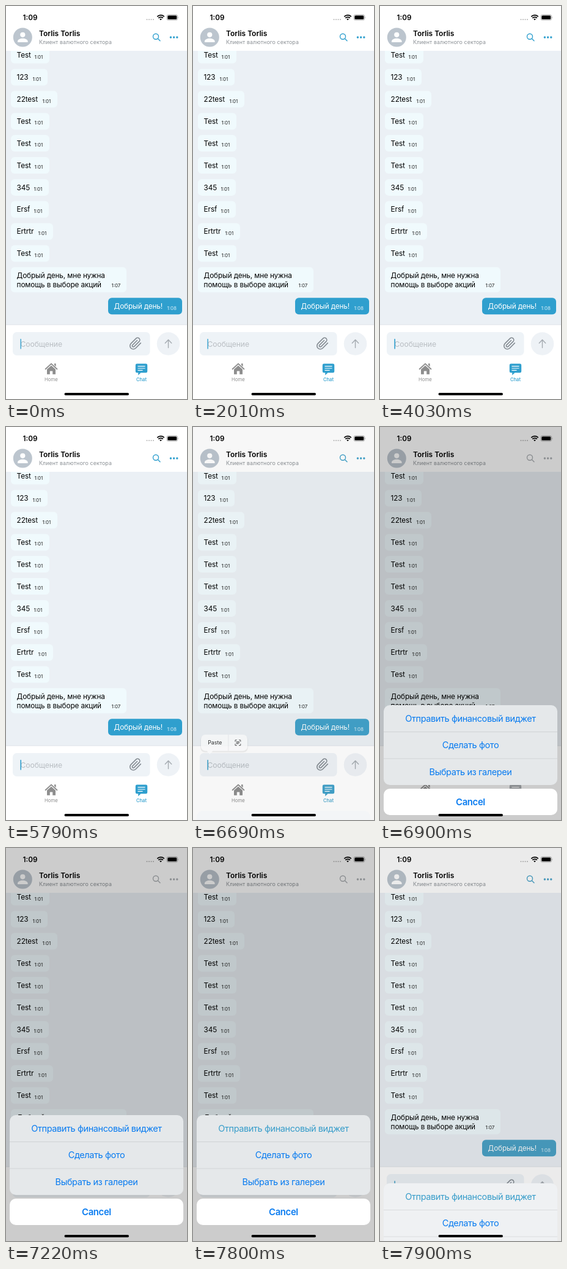
These frames come from a looping animation (296x640 px, 8 s). An HTML page:

```html
<!DOCTYPE html>
<html lang="ru">
<head>
<meta charset="utf-8">
<title>Chat</title>
<style>
  html, body { margin: 0; width: 100%; height: 100%; overflow: hidden; background: #fff; }
  svg { display: block; width: 296px; height: 640px; --accent: rgb(47,159,206); }
  text { font-family: Inter, "Open Sans", sans-serif; white-space: pre; }
  .msg { font-size: 11.8px; letter-spacing: -.12px; }
  .time { font-size: 8px; }
  .row { font-size: 14.5px; letter-spacing: -.4px; fill: #087bf0; text-anchor: middle; }
  .tint { fill: var(--accent); }
  .line { fill: none; stroke-linecap: round; stroke-linejoin: round; }
</style>
</head>
<body>
<svg viewBox="0 0 296 640">
  <rect width="296" height="640" fill="#fff"/>
  <rect y="73" width="296" height="446" fill="#ebf0f5"/>
  <g id="chat"></g>

  <rect width="296" height="73" fill="#fff"/>
  <text x="27.5" y="23" font-size="11.7" font-weight="600">1:09</text>
  <g fill="#b5b5b5">
    <circle cx="230.5" cy="22" r="1"/><circle cx="234" cy="22" r="1"/>
    <circle cx="237.5" cy="22" r="1"/><circle cx="241" cy="22" r="1"/>
  </g>
  <g class="line" stroke="#000" stroke-width="1.7" style="stroke-linecap:butt">
    <path d="M247.3 17.3a8 8 0 0 1 11.4 0M249.3 19.6a5.2 5.2 0 0 1 7.4 0"/>
    <path d="M251.2 21.2L253 23.2L254.8 21.2a2.8 2.8 0 0 0 -3.6 0z" fill="#000" stroke="none"/>
  </g>
  <rect x="263" y="14.3" width="17.6" height="8.8" rx="2.6" fill="none" stroke="#999" stroke-width=".8"/>
  <rect x="264.3" y="15.6" width="15" height="6.2" rx="1.5"/>
  <path d="M281.6 17.2q1.4 1.5 0 3z" fill="#999"/>

  <circle cx="27.3" cy="51" r="15.5" fill="#bcc5ce"/>
  <circle cx="27.3" cy="46.8" r="4.1" fill="#fff"/>
  <path d="M19 59v-1.2c0-3.4 4.6-5 8.3-5s8.3 1.6 8.3 5V59z" fill="#fff"/>
  <text x="54" y="49" font-size="12" font-weight="600">Torlis Torlis</text>
  <text x="54" y="62" font-size="8.8" letter-spacing=".12" fill="#8b9095">Клиент валютного сектора</text>
  <g class="line" style="stroke:var(--accent)" stroke-width="1.4">
    <circle cx="245" cy="49.8" r="4.5"/><path d="M248.4 53.2L252 56.8"/>
  </g>
  <g class="tint">
    <circle cx="269.4" cy="51" r="1.7"/><circle cx="274.6" cy="51" r="1.7"/><circle cx="279.8" cy="51" r="1.7"/>
  </g>

  <rect y="519" width="296" height="121" fill="#fff"/>
  <rect y="518.5" width="296" height="1" fill="#dfe4e9"/>
  <rect x="11" y="531" width="224.5" height="38" rx="6.5" fill="#eef3f7"/>
  <text x="23.5" y="554.8" font-size="12.2" letter-spacing="-.1" fill="#b9bec3">Сообщение</text>
  <rect id="caret" class="tint" x="23.4" y="542" width="1.6" height="16.5" rx=".6"/>
  <path class="line" transform="translate(201 539) scale(.9)" stroke="#858c93" stroke-width="1.8"
    d="M21.44 11.05l-9.19 9.19a6 6 0 0 1-8.49-8.49l9.19-9.19a4 4 0 0 1 5.66 5.66l-9.2 9.19a2 2 0 0 1-2.83-2.83l8.49-8.48"/>
  <circle cx="265.5" cy="550" r="18.8" fill="#eef2f6"/>
  <path class="line" d="M265.5 556.5V543.8M260.3 549l5.2-5.4l5.2 5.4" stroke="#a5abb1" stroke-width="1.4"/>

  <g fill="#8e8e8e">
    <path class="line" d="M64.6 591.2L74 582.6L83.4 591.2" style="stroke:#8e8e8e" stroke-width="1.9"/>
    <path d="M79 582.2h2.6v5l-2.6-2.4z"/>
    <path d="M74 585.4l7 6.3v8.1h-4.8v-5.4h-4.4v5.4H67v-8.1z"/>
    <text x="74" y="611" font-size="7.8" text-anchor="middle">Home</text>
  </g>
  <g class="tint">
    <path d="M214.2 582.5h14.6a2.4 2.4 0 0 1 2.4 2.4v10a2.4 2.4 0 0 1-2.4 2.4h-8.3l-4.3 4v-4h-2a2.4 2.4 0 0 1-2.4-2.4v-10a2.4 2.4 0 0 1 2.4-2.4z"/>
    <path d="M215.5 586.7h12M215.5 590h12M215.5 593.3h8" stroke="#fff" stroke-width="1.2"/>
    <text x="221.5" y="611" font-size="7.6" font-weight="500" text-anchor="middle">Chat</text>
  </g>

  <rect id="dim" width="296" height="640"/>

  <g id="menu">
    <rect x="-1" y="1" width="97" height="35" rx="9" fill="#000" opacity=".08"/>
    <path d="M9 0h77a9 9 0 0 1 9 9v15a9 9 0 0 1-9 9H24l-6 7l-6-7H9a9 9 0 0 1-9-9V9a9 9 0 0 1 9-9z" fill="#f7f8f9"/>
    <text x="14" y="20.5" font-size="11">Paste</text>
    <path d="M56 0v33" stroke="#d9dadc" stroke-width=".8"/>
    <path class="line" stroke="#222" stroke-width="1.1"
      d="M70 14v-3h3M78 11h3v3M81 19v3h-3M73 22h-3v-3M72.5 14.5h6M72.5 16.5h6M72.5 18.5h4"/>
  </g>

  <g id="sheet">
    <rect id="panel" x="6" y="435" width="284" height="130" rx="10"/>
    <path id="press" d="M6 478.5V445a10 10 0 0 1 10-10h264a10 10 0 0 1 10 10v33.5z"/>
    <path d="M6 478.5h284M6 522h284" stroke="#000" stroke-opacity=".13" stroke-width=".7"/>
    <text id="first" class="row" x="148" y="462">Отправить финансовый виджет</text>
    <text class="row" x="148" y="505.4">Сделать фото</text>
    <text class="row" x="148" y="549">Выбрать из галереи</text>
    <rect x="6" y="571" width="284" height="43" rx="10" fill="#fff"/>
    <text class="row" x="148" y="598" style="font-size:14.8px;font-weight:600;letter-spacing:-.3px">Cancel</text>
  </g>
  <rect x="95.5" y="630" width="105.5" height="4" rx="2"/>
</svg>
<script>
const LOOP = 8000;
const $ = id => document.getElementById(id);
const svg = document.querySelector('svg');
const mix = (a, b, k) => `rgb(${a.map((v, i) => Math.round(v + (b[i] - v) * k))})`;

// Incoming messages: text and right edge of the bubble
const incoming = [
  ['Test', 71], ['123', 68], ['22test', 84], ['Test', 71], ['Test', 71],
  ['Test', 71], ['345', 70], ['Ersf', 70], ['Ertrtr', 77], ['Test', 71]
];

function bubble(x, y, right, height, lines, time, own) {
  const ink = own ? '#fff' : '#000';
  const box = `<rect x="${x}" y="${y}" width="${right - x}" height="${height}" rx="6" ` +
    (own ? 'class="tint"/>' : 'fill="#f0fafd"/>');
  const body = lines.map((s, i) =>
    `<text class="msg" x="${x + 9.6}" y="${y + 17.7 + i * 15}" fill="${ink}">${s}</text>`).join('');
  const stamp = `<text class="time" x="${right - 24.6}" y="${y + height - 7.8}" ` +
    `fill="${own ? '#d9eef7' : '#222'}">${time}</text>`;
  return box + body + stamp;
}

$('chat').innerHTML =
  incoming.map(([s, right], i) => bubble(8, 66.6 + i * 35.88, right, 27, [s], '1:01')).join('') +
  bubble(8, 425.2, 197, 41, ['Добрый день, мне нужна', 'помощь в выборе акций'], '1:07') +
  bubble(167, 475.3, 288, 27, ['Добрый день!'], '1:08', true);

// Sheet steps: start, drop below rest, dimming, grey share of the accent
const sheetSteps = [
  [0, 205, 0, 0], [6690, 190, .03, .15], [6800, 98, .11, .58], [6900, 18, .2, 1],
  [7010, 5, .2, 1], [7110, 1, .2, 1], [7220, 0, .2, 1], [7900, 111, .08, .22]
];
// Menu steps: start, x, y, scale, opacity
const menuSteps = [
  [0, 7, 490, 1, 0], [5900, 12, 503, .75, .5], [6010, 7, 490, 1, 1],
  [6690, 13, 501, .8, .8], [6800, 23, 520, .45, .45], [6900, 23, 520, .45, 0]
];
const stepAt = (steps, t) => steps.filter(s => s[0] <= t).pop();

function caretAt(t) {
  const p = (t - 990 + 1014) % 1014;
  return p < 115 ? .85 : p < 355 ? 0 : p < 470 ? .5 : 1;
}

function draw(t) {
  const [, drop, dim, grey] = stepAt(sheetSteps, t);
  const [, x, y, scale, alpha] = stepAt(menuSteps, t);
  svg.style.setProperty('--accent', mix([47, 159, 206], [172, 176, 180], grey));
  $('caret').setAttribute('opacity', caretAt(t));
  $('dim').setAttribute('opacity', dim);
  $('menu').setAttribute('transform', `translate(${x} ${y}) scale(${scale})`);
  $('menu').setAttribute('opacity', alpha);
  $('sheet').setAttribute('transform', `translate(0 ${drop})`);
  $('panel').setAttribute('fill', mix([245, 247, 249], [229, 232, 234], dim / .2));
  $('press').setAttribute('opacity', t >= 7660 && t < 7800 ? .06 : 0);
  $('first').style.fill = t >= 7660 ? '#389dca' : '#087bf0';
}

const start = performance.now();
function tick() {
  draw((performance.now() - start) % LOOP);
  requestAnimationFrame(tick);
}
draw(0);
requestAnimationFrame(tick);
</script>
</body>
</html>
```
